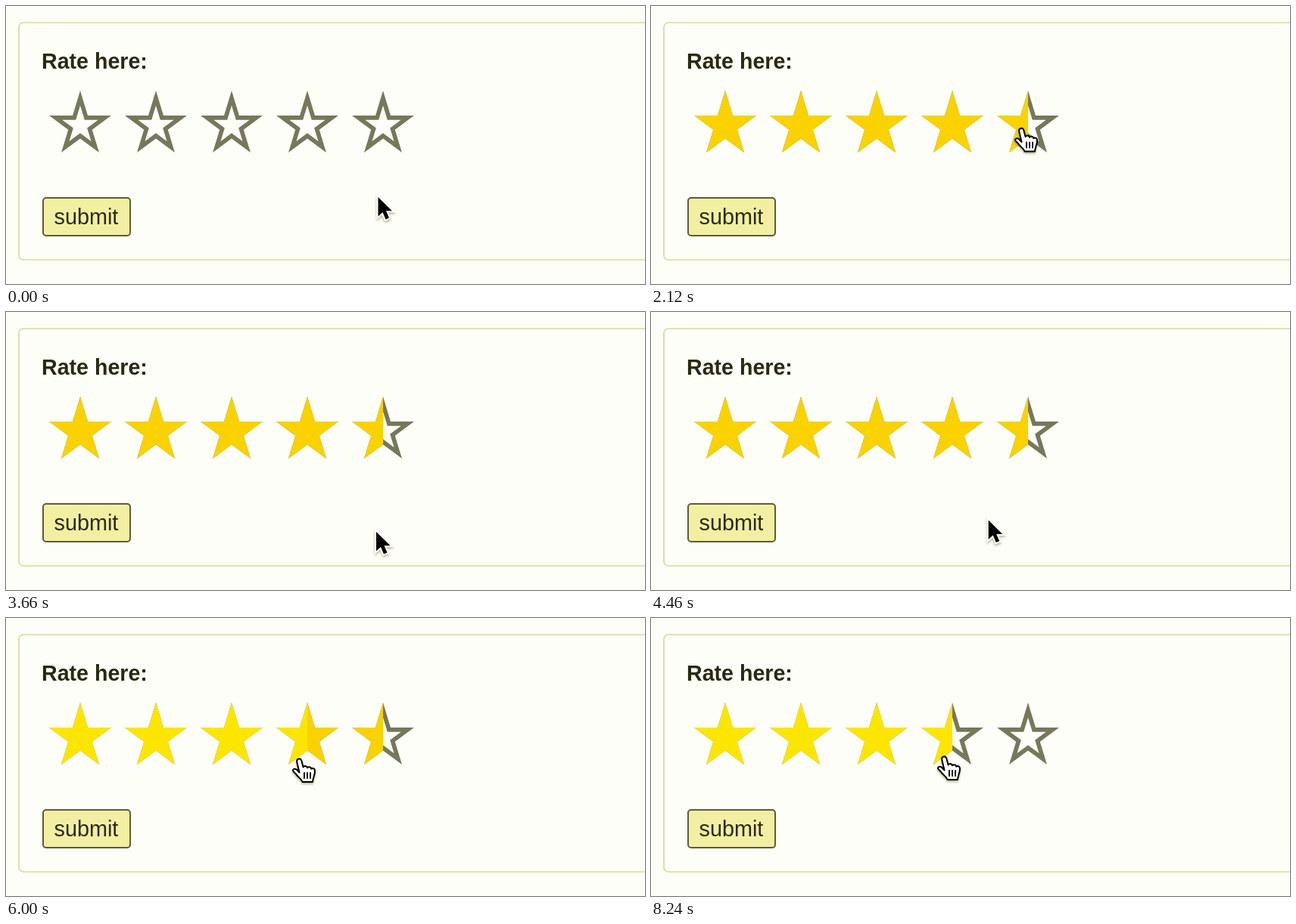
These frames come from a looping animation (844 by 368 pixels, 8340 ms). An HTML page:

```html
<!DOCTYPE html>
<html lang="en">
<head>
<meta charset="utf-8">
<title>Star rating</title>
<style>
  html, body { margin: 0; width: 100%; height: 100%; overflow: hidden; background: #fefef8; }
  svg { display: block; width: 844px; height: 368px; }
  text { font-family: "Liberation Sans", Arial, sans-serif; fill: #2a2a12; }
  .cursor { filter: drop-shadow(0 2px 1.5px rgba(70, 70, 0, .4)); }
</style>
</head>
<body>
<svg viewBox="0 0 844 368" xmlns="http://www.w3.org/2000/svg">
  <defs>
    <path id="star" d="M0 0L10 33H41L15.8 51.7L25 82L0 63.4L-25 82L-15.8 51.7L-41 33H-10Z"/>
    <clipPath id="inside"><use href="#star"/></clipPath>
    <clipPath id="left"><rect x="-50" y="-5" width="50" height="95"/></clipPath>
    <clipPath id="right"><rect x="0" y="-5" width="50" height="95"/></clipPath>
  </defs>
  <rect width="844" height="368" fill="#fefef8"/>
  <rect x="17" y="22" width="860" height="314" rx="6" fill="none" stroke="#d9d99c" stroke-width="1.7"/>
  <text x="47" y="83" font-size="28.6" font-weight="700">Rate here:</text>
  <g id="stars"></g>
  <rect x="49" y="254" width="115" height="50" rx="4" fill="#f3efa2" stroke="#5c5b38" stroke-width="2"/>
  <text x="63.5" y="289" font-size="28.8">submit</text>
  <g id="arrow" class="cursor">
    <path d="M0 0V25.5L6 20L10 29.5L14.5 27.6L10.5 18.3H18.5Z" fill="#000" stroke="#fff" stroke-width="4" paint-order="stroke"/>
  </g>
  <g id="hand" class="cursor" stroke="#000" stroke-width="2" stroke-linejoin="round" stroke-linecap="round">
    <path fill="#fff" d="M-.5 19L-3.8 5C-4.6 .8 .8 -.6 2.2 3L4.6 12C5.5 9.8 9.5 10 10 12.8C11.5 11 14.8 11.5 15.3 14.2C17 12.8 20 13.5 20 17C20.3 22 17.5 25 17 31.5H3.5C2.5 28 -1.5 25.5 -4 22.5C-6 19.5 -8.5 18.5 -9 16.5C-9.3 14.3 -6 13.6 -4 15.2Z"/>
    <path fill="none" d="M6 19.5V26.5M10 19.5V26.5M14 19.5V26.5"/>
  </g>
</svg>
<script>
const LOOP = 8340;
const GREY = '#77775c', GOLD = '#f9d200', BRIGHT = '#fce600';
const LABEL_BOTTOM = 189.5;

// Pointer path: time, x, y
const path = [
  [0, 491.5, 253], [400, 491.5, 253], [700, 493, 215], [920, 491, 172], [1140, 490, 161],
  [2820, 490, 161], [2920, 490, 162], [3140, 498, 205], [3380, 503, 270], [3520, 499, 292],
  [3660, 489, 291], [3760, 489, 291], [4100, 474, 289], [4460, 446, 276], [4500, 434, 259],
  [4600, 434, 259], [4960, 430, 215], [5340, 424, 191], [5439, 424, 191], [5440, 401, 189],
  [5700, 396, 188], [6000, 388, 185.5], [6280, 388, 185.5], [6700, 388, 182.5], [LOOP, 388, 182.5]
];
// Rating chosen by clicks, in half stars
const clicks = [[0, 0], [2300, 9], [6500, 7]];

const byId = id => document.getElementById(id);
const halves = [];

function buildStars() {
  let out = '';
  for (let i = 0; i < 5; i++) {
    out += `<g transform="translate(${98 + 100 * i} 112)">
      <use href="#star" clip-path="url(#inside)" fill="none" stroke="${GREY}" stroke-width="11.4" stroke-miterlimit="10"/>
      <use href="#star" class="half" clip-path="url(#left)"/>
      <use href="#star" class="half" clip-path="url(#right)"/></g>`;
  }
  byId('stars').innerHTML = out;
  halves.push(...document.querySelectorAll('.half'));
}

function pointerAt(t) {
  let i = 1;
  while (i < path.length - 1 && t >= path[i][0]) i++;
  const [t0, x0, y0] = path[i - 1], [t1, x1, y1] = path[i];
  const k = (t - t0) / (t1 - t0);
  return [x0 + (x1 - x0) * k, y0 + (y1 - y0) * k];
}

function draw(t) {
  const [x, y] = pointerAt(t);
  const over = y < LABEL_BOTTOM;
  const hover = over ? Math.ceil((x - 48) / 50) : 0;
  const chosen = clicks.filter(c => t >= c[0]).pop()[1];

  halves.forEach((el, i) => {
    const lit = i < Math.max(hover, chosen);
    el.setAttribute('fill', !lit ? 'none' : chosen && i < hover ? BRIGHT : GOLD);
  });
  for (const [id, shown] of [['arrow', !over], ['hand', over]]) {
    byId(id).setAttribute('transform', `translate(${x.toFixed(1)} ${y.toFixed(1)})`);
    byId(id).setAttribute('visibility', shown ? 'visible' : 'hidden');
  }
}

buildStars();
const start = performance.now();
function tick() {
  draw((performance.now() - start) % LOOP);
  requestAnimationFrame(tick);
}
tick();
</script>
</body>
</html>
```
